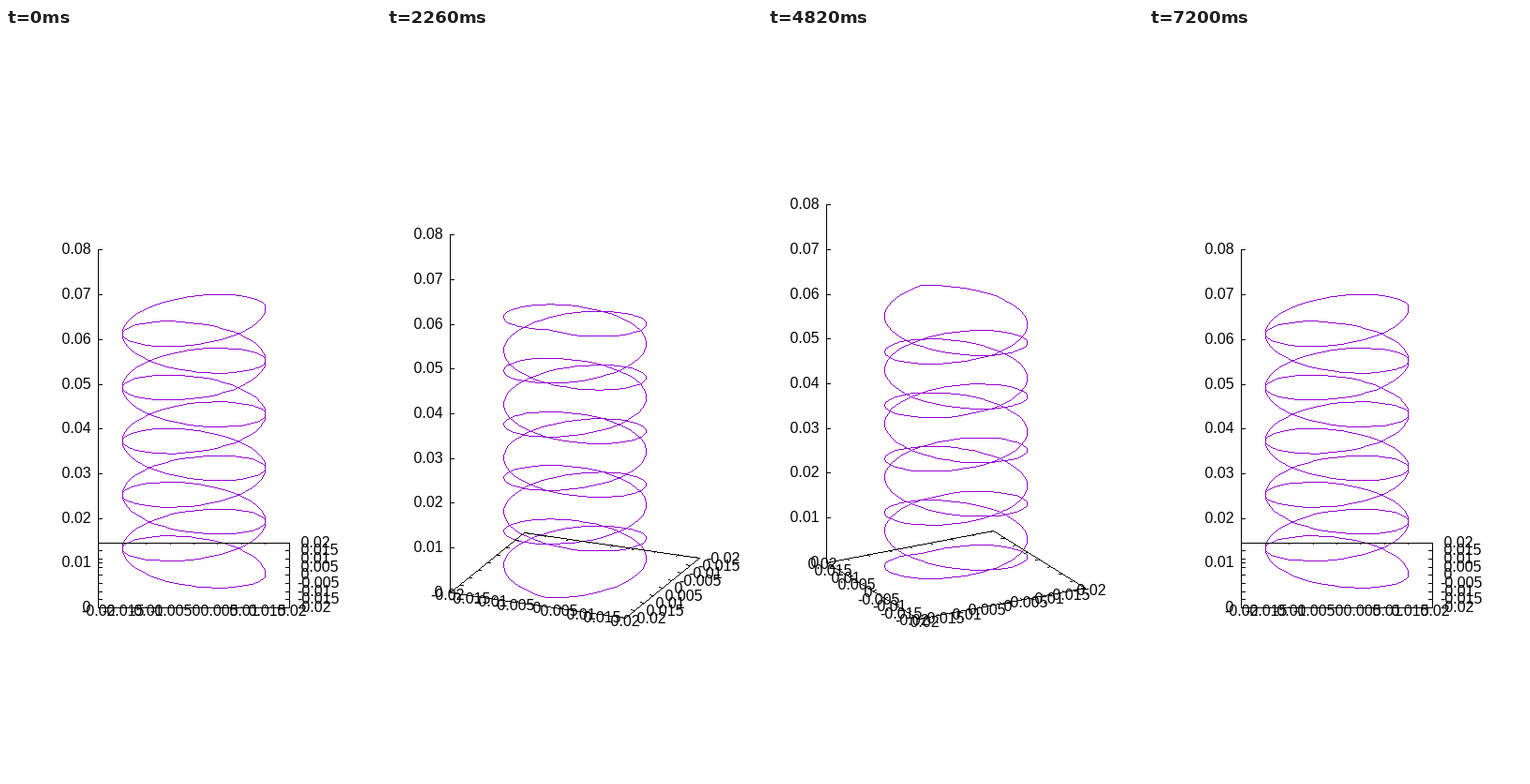
Write a matplotlib script that moves like this. It is 400 px wide and 800 px high and loops after 7.22 s.

```python
import numpy as np
import matplotlib.pyplot as plt
from matplotlib.animation import FuncAnimation

plt.rcParams["font.family"] = "Liberation Sans"
plt.rcParams["text.hinting"] = "default"

W, H, DPI = 400, 800, 100
CX, CY = 200, 583.27              # screen centre of the floor
UNIT = 101.5 / 0.02               # pixels per unit in the floor plane
TILT = np.cos(np.radians(70))
Z_UNIT = 381.5 / 0.08             # pixels per unit of height
LIM, Z_MAX = 0.02, 0.08
TIC, CHAR_W, CHAR_H = 4, 8, 12
TEXT_DY = 5                       # from label anchor to baseline
BLACK, VIOLET = (0, 0, 0), (148, 0, 211)

XY_TICS = np.arange(-4, 5) * 0.005
Z_TICS = np.arange(9) * 0.01

t = np.linspace(0, 10 * np.pi, 251)
HELIX = [(0.015 * np.cos(t), s * 0.015 * np.sin(t), 0.06 * t / t[-1])
         for s in (-1, 1)]

fig = plt.figure(figsize=(W / DPI, H / DPI), dpi=DPI, facecolor="white")
ax = fig.add_axes([0, 0, 1, 1])
ax.axis("off")
canvas = np.full((H, W, 3), 255, np.uint8)
image = ax.imshow(canvas, extent=(0, W, H, 0), aspect="auto",
                  interpolation="nearest")


def labels(values):
    return [ax.text(0, 0, f"{round(v, 3): g}", fontsize=16 * 72 / DPI,
                    va="baseline") for v in values]


x_labels, y_labels, z_labels = (labels(v) for v in (XY_TICS, XY_TICS, Z_TICS))


def stroke(starts, ends, color):
    """Draw hard-edged lines one pixel wide."""
    p, q = np.rint(starts), np.rint(ends)
    n = np.abs(q - p).max(axis=1)
    k = np.arange(n.max() + 1)
    f = k / np.maximum(n, 1)[:, None]
    pts = p[:, None] + (q - p)[:, None] * f[..., None]
    x, y = np.floor(pts[k <= n[:, None]] + 0.5).astype(int).T
    canvas[y, x] = color


def direction(x, y, a):
    """Screen vector of a floor vector, y pointing down."""
    return np.array([x * np.cos(a) + y * np.sin(a),
                     (x * np.sin(a) - y * np.cos(a)) * TILT])


def project(x, y, z, a):
    dx, dy = direction(x, y, a)
    return np.array([CX + UNIT * dx, CY + UNIT * dy - Z_UNIT * z]).T


def place(label, x, y, ha):
    label.set_position((round(x) + 0.5, round(y) + TEXT_DY))
    label.set_ha(ha)


def floor_axis(texts, point, side, inward):
    """Tics on both parallel edges, labels outside the near one."""
    segs = []
    ha = "left" if inward[0] < -0.9 else "right" if inward[0] > 0.9 else "center"
    for v, label in zip(XY_TICS, texts):
        near, far = point(v, side), point(v, -side)
        segs += [(near, near + TIC * inward), (far, far - TIC * inward)]
        place(label, near[0] - CHAR_W * inward[0],
              near[1] - CHAR_H * inward[1], ha)
    return segs


def draw(i):
    deg = i % 360
    a = np.radians(deg)
    quad = deg // 90
    cos_s = 1 if quad in (0, 3) else -1
    sin_s = 1 if quad in (0, 1) else -1

    canvas[:] = 255
    for x, y, z in HELIX:
        path = project(x, y, z, a)
        stroke(path[:-1], path[1:], VIOLET)

    corners = [project(sx * LIM, sy * LIM, 0, a)
               for sx, sy in ((-1, -1), (1, -1), (1, 1), (-1, 1), (-1, -1))]
    segs = list(zip(corners, corners[1:]))
    segs += floor_axis(x_labels, lambda v, s: project(v, s * LIM, 0, a),
                       -cos_s, direction(0, cos_s, a))
    segs += floor_axis(y_labels, lambda v, s: project(s * LIM, v, 0, a),
                       sin_s, direction(-sin_s, 0, a))

    # The height axis stands on the leftmost corner
    x, y = project(-cos_s * LIM, -sin_s * LIM, 0, a)
    segs.append(((x, y), (x, y - Z_UNIT * Z_MAX)))
    for v, label in zip(Z_TICS, z_labels):
        ty = y - Z_UNIT * v
        segs.append(((x, ty), (x + TIC, ty)))
        place(label, x - CHAR_W, ty, "right")
    starts, ends = np.swapaxes(np.array(segs), 0, 1)
    stroke(starts, ends, BLACK)
    image.set_data(canvas)
    return [image, *x_labels, *y_labels, *z_labels]


anim = FuncAnimation(fig, draw, frames=361, interval=20, repeat=True,
                     repeat_delay=0, blit=False)
plt.show()
```
